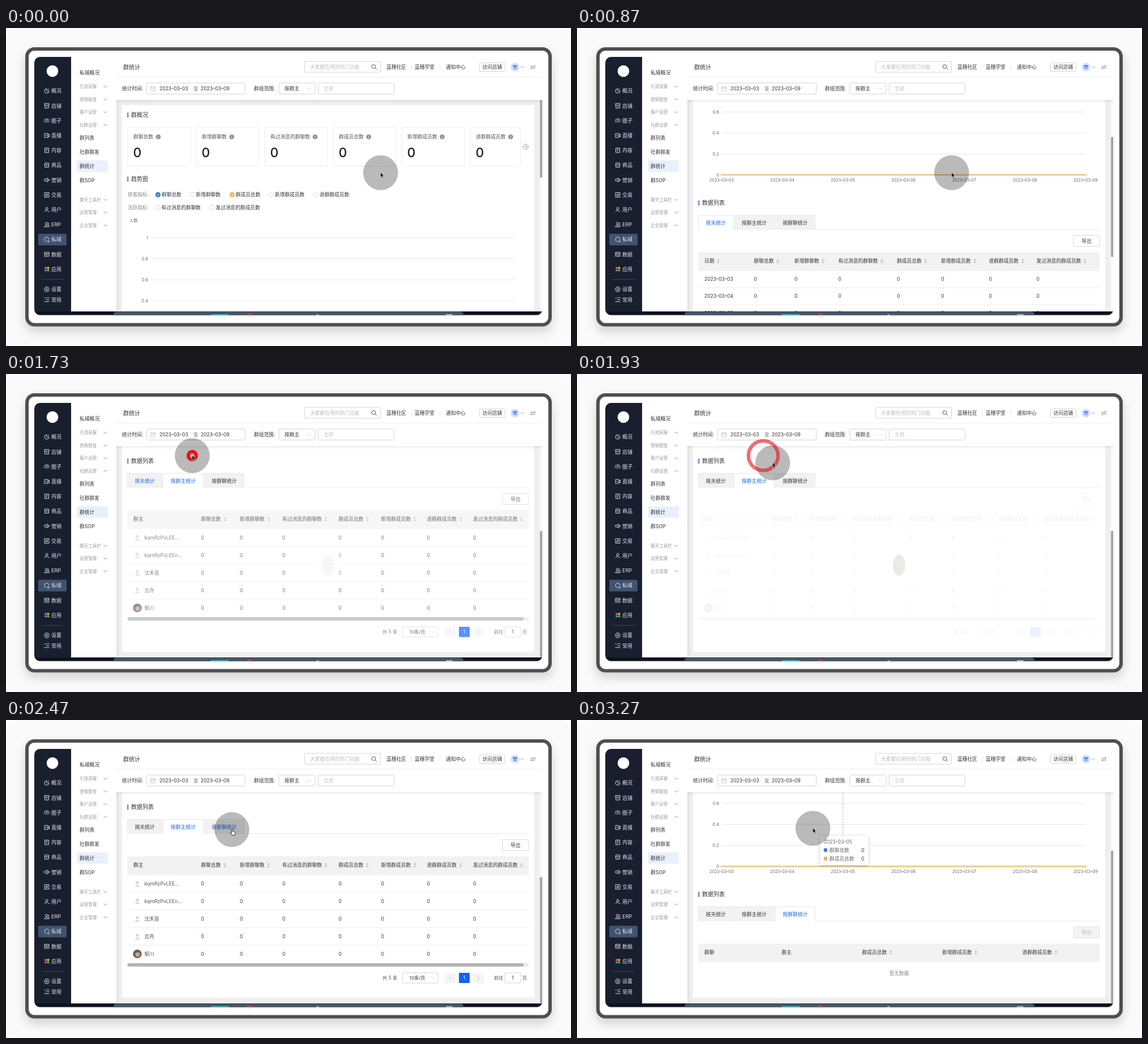
These frames come from a looping animation (998 by 561 pixels, 3.47 s). An HTML page:

```html
<!DOCTYPE html>
<html lang="zh-CN">
<head>
<meta charset="utf-8">
<title>群统计</title>
<style>
html, body { margin: 0; width: 100%; height: 100%; overflow: hidden; background: #fff; }
svg { display: block; width: 998px; height: 561px; }
text { font-family: Inter, "Noto Sans CJK SC", "Noto Sans CJK", sans-serif; white-space: pre; }
</style>
</head>
<body>
<svg id="stage" viewBox="0 0 998 561" xmlns="http://www.w3.org/2000/svg"></svg>
<script>
const LOOP = 3470, STEP = 1000 / 15;
const BLUE = '#1a66dd', ORANGE = '#f0b456', INK = '#333', LINE = '#ebebeb';

// y is the vertical middle of the text
const text = (x, y, s, size = 8.7, fill = INK, extra = '') =>
  `<text x="${x}" y="${y + size * .37}" font-size="${size}" fill="${fill}" ${extra}>${s}</text>`;
const rect = (x, y, w, h, fill, extra = '') =>
  `<rect x="${x}" y="${y}" width="${w}" height="${h}" fill="${fill}" ${extra}/>`;
const circle = (x, y, r, fill, extra = '') => `<circle cx="${x}" cy="${y}" r="${r}" fill="${fill}" ${extra}/>`;
const path = (d, stroke, width = 1, extra = '') =>
  `<path d="${d}" fill="none" stroke="${stroke}" stroke-width="${width}" ${extra}/>`;
const hline = (x1, x2, y, stroke = LINE) => path(`M${x1} ${y}H${x2}`, stroke);
const box = (x, y, w, h, fill = '#fff', stroke = '#d0d0d0') => rect(x, y, w, h, fill, `rx="2" stroke="${stroke}" stroke-width=".9"`);
const chevron = (x, y, color = '#999', dir = 1) => path(`M${x - 3} ${y - 1.5 * dir}L${x} ${y + 1.5 * dir}L${x + 3} ${y - 1.5 * dir}`, color, .9);
const MID = 'text-anchor="middle"', BOLD = 'font-weight="500"';

const METRICS = ['群聊总数', '新增群聊数', '有过消息的群聊数', '群成员总数', '新增群成员数', '退群群成员数', '发过消息的群成员数'];
const day = i => `2023–03–0${3 + i}`;
const range = n => [...Array(n).keys()];

function sidebar() {
  const items = [
    ['概况', 'M0-4A4 4 0 1 0 4 0H0ZM2-4A4 4 0 0 1 4-2'], ['店铺', 'M-4-1V-4H4V-1ZM-3.3-1V4H3.3V-1M-1 1.5H1'],
    ['圈子', 'M-1.6-2a1.6 1.6 0 1 0 3.2 0a1.6 1.6 0 1 0-3.2 0M-2.6 3.5Q0-1.2 2.6 3.5M-3-3Q-5-2-3.4 0L-5 2.5M3-3Q5-2 3.4 0L5 2.5'],
    ['直播', 'M-4-3.5H2V3.5H-4ZM2-1L4.5-2.5V2.5L2 1M-2 0H.5'], ['内容', 'M-3.5-4H3.5V4H-3.5ZM-1.5-2H1.5M-1.5 0H1.5M-1.5 2H0'],
    ['商品', 'M-3.5-1V3.5H3.5V-1M-4-1L-3-4H3L4-1ZM-1 1H1'], ['营销', 'M-4-1.5H-2L1-3.5V3.5L-2 1.5H-4ZM3-2.5V2.5M4.7-1V1'],
    ['交易', 'M-4-4H4V4H-4ZM-2-.8H2L.5-2.3M2 1H-2L-.5 2.5'], ['用户', 'M-2-2a2 2 0 1 0 4 0a2 2 0 1 0-4 0M-4 4Q-3 .5 1 1M1.5 3H4.5'],
    ['ERP', 'M-2.5-2a2 2 0 1 0 4 0a2 2 0 1 0-4 0M-4.5 3.8Q-.5-1.8 3.5 3.8ZM2.5-3.5Q5-2 3 0L5 3.5'],
    ['私域', 'M-2.5 3A4 4 0 1 1 4 0M-2.5 3L-1 4M1 4Q2.7-.5 4.5 4Z'], ['数据', 'M-4-3.5H4V3.5H-4ZM-4-1H4M-2 1.5L0 .5L2 2'],
    ['应用', ''], ['设置', 'M-2.2-4H2.2L4.5 0L2.2 4H-2.2L-4.5 0ZM-1.5 0a1.5 1.5 0 1 0 3 0a1.5 1.5 0 1 0-3 0'],
    ['常用', 'M0-3.5H4.5M-1 0H4.5M-4.5 3.5H4.5M-4.5-2L-3-3.5L-1.5-2']];
  let s = rect(50, 51, 65, 450, '#191f2e') + circle(82, 76, 10.3, '#fff') + rect(57, 363, 50, 20.5, '#42536f', 'rx="2"');
  items.forEach(([label, icon], i) => {
    const y = i < 13 ? 111 + i * 26.2 : 461 + (i - 13) * 18.2;
    s += `<g transform="translate(72 ${y})">${path(icon, '#e3e6ec', .95)}</g>`;
    if (!icon) ['#f14b4b', '#f7b733', '#3f8cff', '#35c46a'].forEach((c, k) =>
      s += circle(70 + k % 2 * 4.4, y - 2.2 + (k >> 1) * 4.4, 2, c));
    s += text(80, y, label, 9, '#e3e6ec');
  });
  return s + hline(62, 102, 443.5, '#3a4150');
}

function submenu() {
  let s = rect(115, 51, 80, 449, '#fff') + rect(125, 233.5, 55, 20, '#e8f0fd', 'rx="1"') + text(130, 78.5, '私域概况', 8.8);
  [['引流获客', 103.5], ['营销裂变', 126], ['客户运营', 148.5], ['社群运营', 171, -1],
   ['聊天工具栏', 303], ['运营管理', 325.5], ['企业管理', 348]].forEach(([label, y, dir = 1]) =>
    s += text(130, y, label, 7.6, '#999') + chevron(175.5, y, '#888', dir));
  ['群列表', '社群群发', '群统计', '群SOP'].forEach((label, i) => s += text(130, 193.5 + i * 25, label, 8.7));
  return s;
}

function header() {
  const y = 69, f = 107;
  return rect(195, 51, 753, 76, '#fff') + rect(195, 127, 753, 6, 'url(#drop)') + hline(195, 947, 86.5, '#f0f0f0') +
    text(207, y, '群统计', 10, INK, BOLD) + box(527.5, 59, 134, 19) + text(537, y, '大家都在用的热门功能', 8.75, '#bbb') +
    circle(649.5, 68, 3.4, 'none', 'stroke="#555"') + path('M652 70.5L655 73.5', '#555') +
    text(672, y, '蓝穗社区') + text(722, y, '蓝穗学堂') + text(777, y, '通知中心') +
    path('M716.5 65V73M766.5 65V73', '#ddd', .8) +
    box(836.5, 61.5, 45, 15) + text(841.5, y, '访问店铺', 8.7, INK, BOLD) +
    circle(899, 69, 7.7, '#d5e2fb') + rect(895.3, 65.5, 7.4, 3, '#4c86f0') + rect(896, 69, 6, 3.5, '#84abf5') + chevron(912, 69) +
    path('M926.5 67.5H935L932.5 65.5M935 70.5H926.5L929 72.5', '#777', .9) +
    text(205, f, '统计时间:') + box(248.5, 97, 174, 19.5) +
    path('M255.5 104H263.5V111H255.5ZM255.5 106.5H263.5M257.5 102.5V105M261.5 102.5V105', '#bbb', .8) +
    text(271, f, day(0), 8.5) + text(331, f, '至', 8.5, '#666') + text(344, f, day(6), 8.5) +
    text(438, f, '群组范围:') + box(482, 97, 64, 19.5) + text(492, f, '按群主') + chevron(535.5, f, '#ccc') +
    box(551.5, 97, 134, 19.5) + text(561, f, '全部', 8.7, '#c4c4c4');
}

const heading = (y, label) => rect(214.5, y - 4.5, 1.6, 9, '#2a5bd0') + text(221, y, label, 10, INK, BOLD);

function overview() {
  let s = heading(153.5, '群概况');
  METRICS.slice(0, 6).forEach((label, i) => {
    const x = 215 + i * 121, ix = x + 10 + label.length * 8.75 + 9;
    s += box(x, 175.5, i < 5 ? 111 : 88.5, 68, '#fff', LINE) + text(x + 10, 192, label, 8.75, '#555') +
      circle(ix, 192, 4.3, '#8f8f8f') + path(`M${ix} 191.4V194.5M${ix} 189.4V190.5`, '#fff') +
      text(x + 9.5, 219.5, '0', 23, '#222', BOLD);
  });
  s += rect(904, 170, 4, 80, '#fff') + circle(918, 209.5, 4.6, 'none', 'stroke="#888" stroke-width=".8"') +
    path('M915.5 209.5H920.5M918.5 207.5L920.5 209.5L918.5 211.5', '#888', .8);
  return s;
}

function radios() {
  const option = ([x, y, label, color]) => (color
    ? circle(x, y, 4.6, color) + path(`M${x - 2} ${y}L${x - .5} ${y + 1.5}L${x + 2} ${y - 1.5}`, '#fff')
    : circle(x, y, 4.2, '#fff', 'stroke="#ccc" stroke-width=".8"')) + text(x + 6.5, y, label, 8.7);
  return heading(266.5, '趋势图') + text(215, 294, '获客指标:', 8.7, '#888') + text(215, 316.5, '活跃指标:', 8.7, '#888') +
    [[268.5, 294, METRICS[0], '#3c78e0'], [329, 294, METRICS[1]], [399.3, 294, METRICS[3], ORANGE], [468.5, 294, METRICS[4]],
     [547.5, 294, METRICS[5]], [268, 316.5, METRICS[2]], [364, 316.5, METRICS[6]]].map(option).join('');
}

function chart() {
  let s = text(218, 339.5, '人数', 7.4, '#666');
  ['1', '0.8', '0.6', '0.4', '0.2', '0'].forEach((v, i) => {
    const y = 370.2 + i * 37;
    s += text(251, y, v, 7.6, '#666', 'text-anchor="end"') + hline(256, 898, y, '#e0e6f1');
  });
  s += path('M255.5 555.2H898', ORANGE, 1.7);
  range(7).forEach(i => {
    const x = 255.5 + i * 107.1;
    s += circle(x, 555.2, 1.7, '#fff', `stroke="${ORANGE}"`) + text(x, 564.2, day(i), 7.2, '#666', MID);
  });
  return s;
}

function tooltip() {
  const row = (y, color, label) => circle(439, y, 3.4, color) + text(446, y, label, 8.7, '#666') + text(502, y, '0', 8.7);
  return `<g id="tip">${path('M469.7 340V555', '#aaa', .9, 'stroke-dasharray="3 2"')}
    ${rect(429, 501, 86, 52, '#fff', 'rx="2" filter="url(#soft)"')}
    ${text(436, 511.7, day(2), 8.4, '#666')}${row(526.5, '#4080e8', METRICS[0])}${row(541.5, ORANGE, METRICS[3])}</g>`;
}

function tabs() {
  const spec = [[214.5, 276, '按天统计'], [278, 348, '按群主统计'], [350.5, 420.5, '按群聊统计']];
  return heading(604.7, '数据列表') + hline(214, 923, 651.5) + spec.map(([a, b, label], i) =>
    `<path id="tab${i}" d="M${a} 652V626.5H${b}V652" stroke="#e6e6e6" stroke-width=".9"/>` +
    text((a + b) / 2, 639.3, label, 8.8, INK, `id="label${i}" ${MID} ${BOLD}`)).join('');
}

function tableHead(columns) {
  return rect(214.5, 691.5, 708.5, 33, '#f2f2f2') + columns.map(([x, label, sortable = true]) => {
    const sx = x + label.length * 8.75 + 7;
    return text(x, 707, label, 8.75, INK, BOLD) + (sortable
      ? `<path d="M${sx - 2.7} 706.3l2.7-3.2l2.7 3.2ZM${sx - 2.7} 708l2.7 3.2l2.7-3.2Z" fill="#c2c2c2"/>` : '');
  }).join('');
}
const exportButton = off => box(877, 662, 46, 19.5, off ? '#f3f3f3' : '#fff', off ? '#e0e0e0' : '#d0d0d0') +
  text(900, 672, '导出', 8.7, off ? '#bbb' : INK, MID);

function pager(y, total) {
  const arrow = (x, d) => rect(x - 9.5, y - 9, 19, 18, '#f4f4f4', 'rx="1"') + path(`M${x + d} ${y - 3}L${x - d} ${y}L${x + d} ${y + 3}`, '#bbb', .9);
  return text(665, y, `共 ${total} 条`, 8.3, '#555') + box(700.5, y - 9, 62.5, 18) + text(726.5, y, '10条/页', 8.2, INK, MID) +
    chevron(754.5, y, '#ccc') + arrow(784.5, 1.5) + rect(800, y - 9, 19, 18, '#0f62fe', 'rx="1"') + text(809.5, y, '1', 8.3, '#fff', MID) +
    arrow(834.5, -1.5) + text(862, y, '前往', 8.2, '#555') + box(881, y - 9, 28, 18) + text(895, y, '1', 8.3, INK, MID) + text(912, y, '页', 8.2, '#555');
}
const zeros = (xs, y) => xs.map(x => text(x, y, '0', 8.6)).join('');

function dayTable() {
  const xs = [312.5, 384, 461.5, 565, 643, 727.5, 811.5];
  return exportButton() + tableHead([[225, '日期'], ...xs.map((x, i) => [x, METRICS[i]])]) +
    range(7).map(i => {
      const y = 739.2 + i * 30;
      return text(225, y, day(i), 8.5) + zeros(xs, y) + hline(214.5, 923, y + 15);
    }).join('') + pager(954, 7);
}

function ownerTable() {
  const xs = [344.5, 413, 488, 587.5, 662.5, 743.5, 825];
  const owners = ['kqmRzPvLEE...', 'kqmRzPvLEEn...', '沈禾苗', '云舟', '郁川'];
  return exportButton() + tableHead([[225, '群主', false], ...xs.map((x, i) => [x, METRICS[i]])]) +
    owners.map((name, i) => {
      const y = 739.7 + i * 31;
      const face = i < 4 ? circle(232, y - 2, 2.7, '#d6d6d6') + `<path d="M227 ${y + 5}Q232 ${y - 1} 237 ${y + 5}Z" fill="#d6d6d6"/>`
        : circle(232, y, 7.6, '#6f5d58') + circle(232.5, y + 1, 4, '#c4a695');
      return face + text(244.5, y, name, 8.7, '#555') + zeros(xs, y) + (i < 4 ? hline(214.5, 923, y + 15.5) : '');
    }).join('') + rect(214.5, 880, 708.5, 6, '#ececec') + rect(214.5, 880, 700, 6, '#b4b4b4', 'rx="3"') + pager(906, 5);
}

function chatTable() {
  return exportButton(true) + tableHead([[225, '群聊', false], [361.5, '群主', false], [503.5, METRICS[3]], [645, METRICS[4]], [786.5, METRICS[5]]]) +
    text(569, 744, '暂无数据', 8.7, '#888', MID);
}

const HEIGHTS = [999, 951, 797];  // page height for each tab
const stage = document.getElementById('stage');
stage.innerHTML = `<defs>
  <clipPath id="screen"><rect x="50" y="51" width="897.5" height="455.5" rx="10"/></clipPath>
  <clipPath id="view"><rect x="195" y="127" width="753" height="373"/></clipPath>
  <linearGradient id="drop" x2="0" y2="1"><stop stop-opacity=".07"/><stop offset="1" stop-opacity="0"/></linearGradient>
  <linearGradient id="side"><stop stop-opacity=".06"/><stop offset="1" stop-opacity="0"/></linearGradient>
  <filter id="soft" x="-20%" y="-20%" width="140%" height="150%"><feDropShadow dx="0" dy="1" stdDeviation="2.5" flood-opacity=".25"/></filter>
  <filter id="deep" x="-10%" y="-10%" width="120%" height="130%"><feDropShadow dx="0" dy="9" stdDeviation="9" flood-opacity=".16"/></filter>
</defs>` +
  rect(0, 0, 998, 561, '#fafafa', 'rx="20"') +
  rect(37, 37, 924, 486.5, '#fff', 'rx="13" stroke="#4f4f4f" stroke-width="6" filter="url(#deep)"') +
  `<g clip-path="url(#screen)">
    ${rect(50, 51, 898, 456, '#fff')}
    <g clip-path="url(#view)">${rect(195, 127, 748, 373, '#efefef')}
      <g id="page">${rect(205, 136, 728, 900, '#fff')}${overview()}${radios()}${chart()}${tabs()}
        ${[dayTable, ownerTable, chatTable].map((f, i) => `<g id="table${i}">${f()}</g>`).join('')}
        <g id="loading">${rect(206, 653, 726, 100, '#fff', 'id="veil"')}
          <g id="mascot">${rect(-25, -26, 56, 54, '#fff')}<ellipse rx="11" ry="18.5" fill="#eceae8"/></g></g>
        <rect id="foot" x="195" width="748" height="200" fill="#efefef"/>${tooltip()}
      </g>
      ${rect(943, 127, 5, 373, '#fafafa')}<rect id="thumb" x="943.2" width="4.3" rx="2" fill="#a3a3a3"/>
    </g>
    ${submenu()}${rect(195, 127, 6, 373, 'url(#side)')}${header()}${sidebar()}
    ${rect(50, 500, 898, 7, '#0d1420')}${rect(190, 500.5, 618, 12, '#495664', 'rx="5"')}
    ${rect(361, 505, 33, 4, '#43c6d8', 'rx="2"')}${circle(430, 511, 7, '#d9453f')}${circle(550.5, 508, 3, '#ccd3da')}${rect(777, 505, 12, 3, '#ccd3da', 'rx="1"')}
  </g>
  <g id="pointer">${circle(0, 0, 30.8, '#000', 'opacity=".27"')}</g>
  <circle id="ring" fill="none" stroke="#e9141a" stroke-width="6.3"/>
  <g id="cursor">
    <path id="arrow" d="M-.3-1V8.3L1.7 6.5L3.2 9.8L4.9 9L3.4 5.8H6Z" fill="#111" stroke="#fff" stroke-width=".6"/>
    <path id="hand" d="M-.5 5V-.5Q.5-2 1.5-.5V3L5 4Q6.3 4.3 6 6L5 10H0L-2.8 6.3Q-2.5 4.5-.5 6Z" fill="#fff" stroke="#111" stroke-width=".9"/>
  </g>`;

const $ = Object.fromEntries([...stage.querySelectorAll('[id]')].map(e => [e.id, e]));
const set = (e, attrs) => { for (const k in attrs) e.setAttribute(k, attrs[k]); };
const show = (e, on) => set(e, { display: on ? 'inline' : 'none' });

// keys: [step, value, ...]; linear between them
function track(keys, n) {
  const i = keys.findIndex(k => k[0] > n);
  if (i < 0) return keys[keys.length - 1].slice(1);
  if (i === 0) return keys[0].slice(1);
  const [a, b] = [keys[i - 1], keys[i]], p = (n - a[0]) / (b[0] - a[0]);
  return a.slice(1).map((v, j) => v + (b[j + 1] - v) * p);
}
const SCROLL = [[5, 0], [8, 95], [10, 95], [13, 296], [14, 370], [15, 430], [16, 475], [17, 499]];
const POINTER = [[18, 661.7, 255.3], [19, 645, 248], [20, 590, 227], [22, 435, 173], [24, 345, 148], [25, 329, 144],
  [27, 329, 144], [28, 333, 147], [32, 384, 186], [33, 390, 189.8], [36, 398, 193], [39, 401, 194], [40, 401, 194], [42, 416.7, 191]];
const CLICKS = [[26, 329, 144], [39.65, 401, 194]];

function draw(ms) {
  const n = Math.floor((ms % LOOP + 5) / STEP);
  const tab = n < 26 ? 0 : n < 40 ? 1 : 2;
  const bottom = HEIGHTS[tab], max = bottom - 500;
  const scroll = Math.min(track(SCROLL, n)[0], max);
  set($.page, { transform: `translate(0 ${-scroll})` });
  set($.foot, { y: bottom - 10 });

  const size = 448 * 448 / (max + 448);
  set($.thumb, { y: 52 + (448 - size) * scroll / max, height: size });

  const click = CLICKS[tab === 2 ? 1 : 0], age = n - click[0];
  const hover = n >= 24 && n < 26 ? 1 : n >= 34 && n < 40 ? 2 : -1;
  for (let i = 0; i < 3; i++) {
    show($['table' + i], i === tab);
    set($['tab' + i], { fill: i === tab ? '#fff' : '#f2f2f2' });
    const lit = i === tab || i === hover || (i === tab - 1 && age < 1);
    set($['label' + i], { fill: lit ? BLUE : INK });
  }

  const veil = age < 0 ? 0 : Math.max(0, Math.min(.3 + .3 * age, .3 + .3 * (7 - age), .92));
  show($.loading, veil > 0);
  set($.veil, { height: bottom - 663, opacity: veil });
  set($.mascot, { transform: `translate(569 ${(bottom + 643) / 2 - 8.5})`, opacity: Math.min(1, veil / .9) });
  show($.tip, n >= 41);

  const [x, y] = track(POINTER, n);
  set($.pointer, { transform: `translate(${x} ${y})` });
  set($.cursor, { transform: `translate(${x} ${y})` });
  const onTab = (n >= 24 && n < 26) || (n >= 33 && n < 40);
  show($.hand, onTab);
  show($.arrow, !onTab);

  const ringing = age >= 0 && age < 7.8;
  show($.ring, ringing);
  if (ringing) set($.ring, { cx: click[1], cy: click[2], r: 7 + 6.4 * age, opacity: 1 - age / 7.8 });
}

function tick() {
  draw(performance.now());
  requestAnimationFrame(tick);
}
tick();
</script>
</body>
</html>
```
